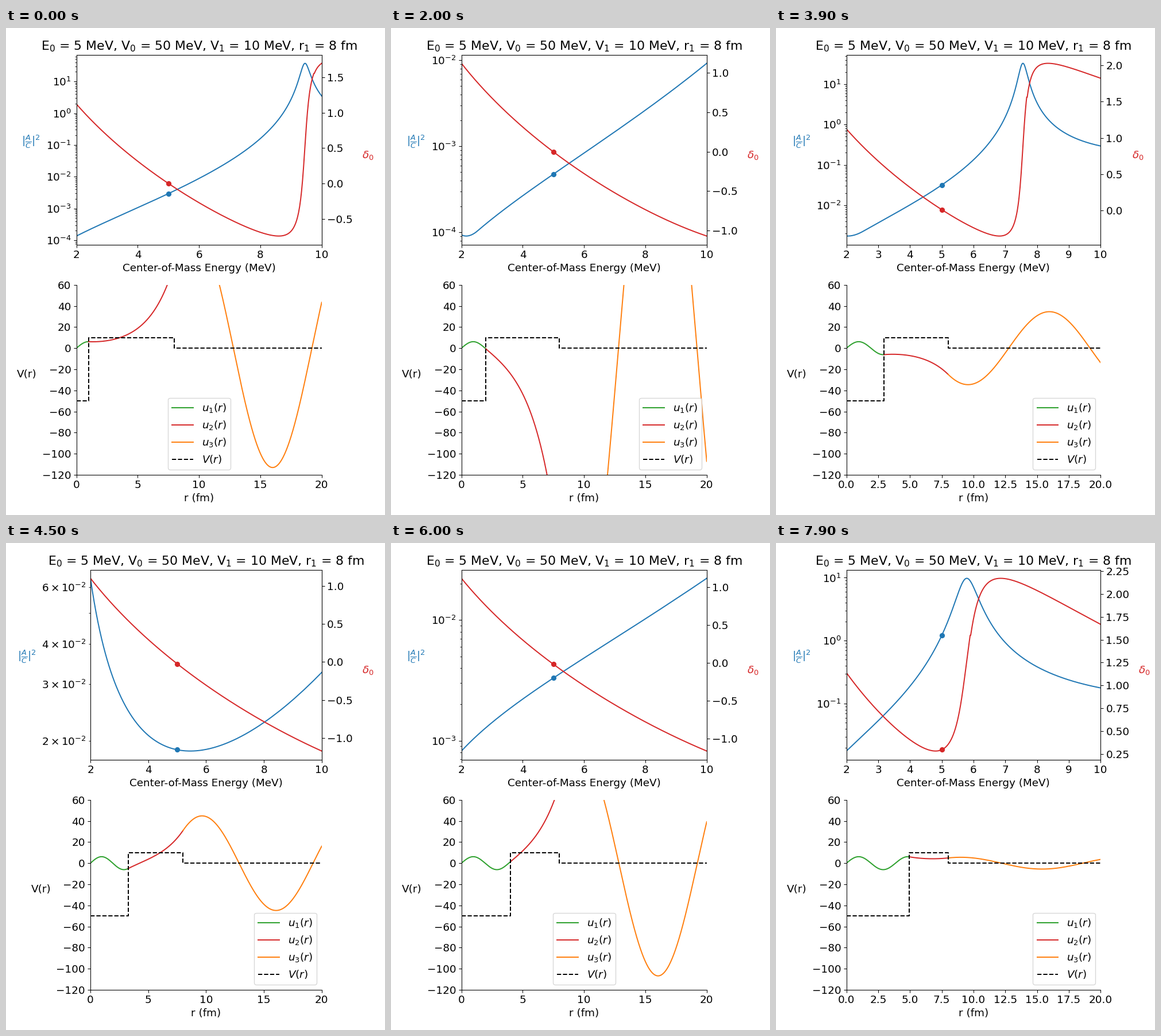
Animation, 660 px wide and 849 px high, one loop 8000 ms. Source, as a matplotlib script:

```python
import numpy as np
import matplotlib.pyplot as plt
from matplotlib.animation import FuncAnimation

WIDTH, HEIGHT = 660, 849
DPI, LAYOUT_DPI = WIDTH / 7, 100   # the page is laid out at 100 dpi, shown smaller
FRAMES, INTERVAL = 80, 100
FONT = 14
PAD = 1.08 * FONT * DPI / 72       # outer margin in pixels
V0, V1, R1, R_MAX = 50, 10, 8, 20
E0 = 5
MASS, HBARC = 938.27, 197.327      # MeV, MeV fm
SLOPE = 10                         # u'(0)

plt.rcParams.update({"font.size": FONT, "font.family": "DejaVu Sans"})

energies = np.linspace(2, 10, 500)
far_r = np.linspace(R1, R_MAX, 400)


def wavenumber(energy):
    return np.sqrt(2 * MASS * np.maximum(energy, 1e-9)) / HBARC


def well(r, energy):
    """Wave function and slope inside the well."""
    k = wavenumber(energy + V0)
    return SLOPE / k * np.sin(k * r), SLOPE * np.cos(k * r)


def barrier(r, energy, edge):
    """Wave function and slope under the barrier."""
    u, du = well(edge, energy)
    kappa = wavenumber(V1 - energy)
    c, s = np.cosh(kappa * (r - edge)), np.sinh(kappa * (r - edge))
    return u * c + du / kappa * s, du * c + u * kappa * s


def outside(energy, edge):
    """Amplitude, phase at R1 and wavenumber of the free wave."""
    k = wavenumber(energy)
    u, du = barrier(R1, energy, edge)
    return np.hypot(u, du / k), np.arctan2(u, du / k), k


def free_wave(r, amp, phase, k):
    return amp * np.sin(phase + k * (r - R1))


def scattering(edge):
    """Amplitude ratio and phase shift over all energies."""
    amp, phase, k = outside(energies, edge)
    peak = free_wave(far_r[:, None], amp, phase, k).max(axis=0)
    ratio = (SLOPE / wavenumber(energies + V0) / peak) ** 2
    delta = np.arctan(np.tan(phase - k * R1))
    step = np.diff(delta)
    step[np.abs(step) > 2] = 0     # close the jumps between arctan branches
    return ratio, delta[0] + np.concatenate(([0], np.cumsum(step)))


def padded(values):
    low, high = values.min(), values.max()
    margin = 0.05 * (high - low)
    return low - margin, high + margin


# the sliver of extra height keeps the pixel count from rounding down
fig, (top, low) = plt.subplots(2, 1, dpi=DPI,
                               figsize=(7, (HEIGHT + 0.01) / DPI))
shift = top.twinx()

top.set_title(r"E$_0$ = 5 MeV, V$_0$ = 50 MeV, V$_1$ = 10 MeV, r$_1$ = 8 fm")
top.set_xlabel("Center-of-Mass Energy (MeV)")
top.set_xlim(2, 10)
top.set_yscale("log")
top.set_ylabel(r"$|\frac{A}{C}|^2$", color="tab:blue", rotation=0, labelpad=20)
shift.set_ylabel(r"$\delta_0$", color="tab:red", rotation=0, labelpad=20)
ratio_line, = top.plot([], [], color="tab:blue")
ratio_dot, = top.plot([], [], "o", color="tab:blue")
delta_line, = shift.plot([], [], color="tab:red")
delta_dot, = shift.plot([], [], "o", color="tab:red")

low.set_xlim(0, R_MAX)
low.set_ylim(-120, 60)
low.set_xlabel("r (fm)")
low.set_ylabel("V(r)", rotation=0, labelpad=20)
low.spines[["top", "right"]].set_visible(False)
u1_line, = low.plot([], [], color="tab:green", label="$u_1(r)$")
u2_line, = low.plot([], [], color="tab:red", label="$u_2(r)$")
u3_line, = low.plot([], [], color="tab:orange", label="$u_3(r)$")
v_line, = low.plot([], [], "--", color="black", label="$V(r)$")
low.legend(loc="best")


def update_curves(i):
    r0 = 1 + 0.05 * i
    # on a 0.01 fm grid the step lands half a cell beside r0
    edge = r0 + (0.005 if r0 > 2 else -0.005)

    ratio, delta = scattering(edge)
    ratio_line.set_data(energies, ratio)
    delta_line.set_data(energies, delta)
    ratio_dot.set_data([E0], [np.interp(E0, energies, ratio)])
    delta_dot.set_data([E0], [np.interp(E0, energies, delta)])
    top.set_ylim(*(10 ** v for v in padded(np.log10(ratio))))
    shift.set_ylim(*padded(delta))

    r = np.linspace(0, edge, 150)
    u1_line.set_data(r, well(r, E0)[0])
    r = np.linspace(edge, R1, 200)
    u2_line.set_data(r, barrier(r, E0, edge)[0])
    u3_line.set_data(far_r, free_wave(far_r, *outside(E0, edge)))
    v_line.set_data([0, r0, r0, R1, R1, R_MAX], [-V0, -V0, V1, V1, 0, 0])


# rows and the usual left edge stay fixed; the sides follow the tick labels
draft = top.get_position()
update_curves(0)
fig.dpi = LAYOUT_DPI
fig.tight_layout()
fig.dpi = DPI
rows = {ax: ax.get_position() for ax in (top, low)}


def fit_sides():
    """Fit both axes between the labels, measured on the draft position."""
    top.set_position(draft)
    renderer = fig.canvas.get_renderer()
    ink_left = top.yaxis.get_tightbbox(renderer).x0
    ink_right = shift.yaxis.get_tightbbox(renderer).x1
    left = max(rows[top].x0, draft.x0 + (PAD - ink_left) / WIDTH)
    right = draft.x1 + (WIDTH - PAD - ink_right) / WIDTH
    for ax, row in rows.items():
        ax.set_position([left, row.y0, right - left, row.height])


def draw(i):
    update_curves(i)
    fit_sides()
    return []


anim = FuncAnimation(fig, draw, frames=FRAMES, interval=INTERVAL,
                     init_func=lambda: [], repeat=True, repeat_delay=0)
plt.show()
```
